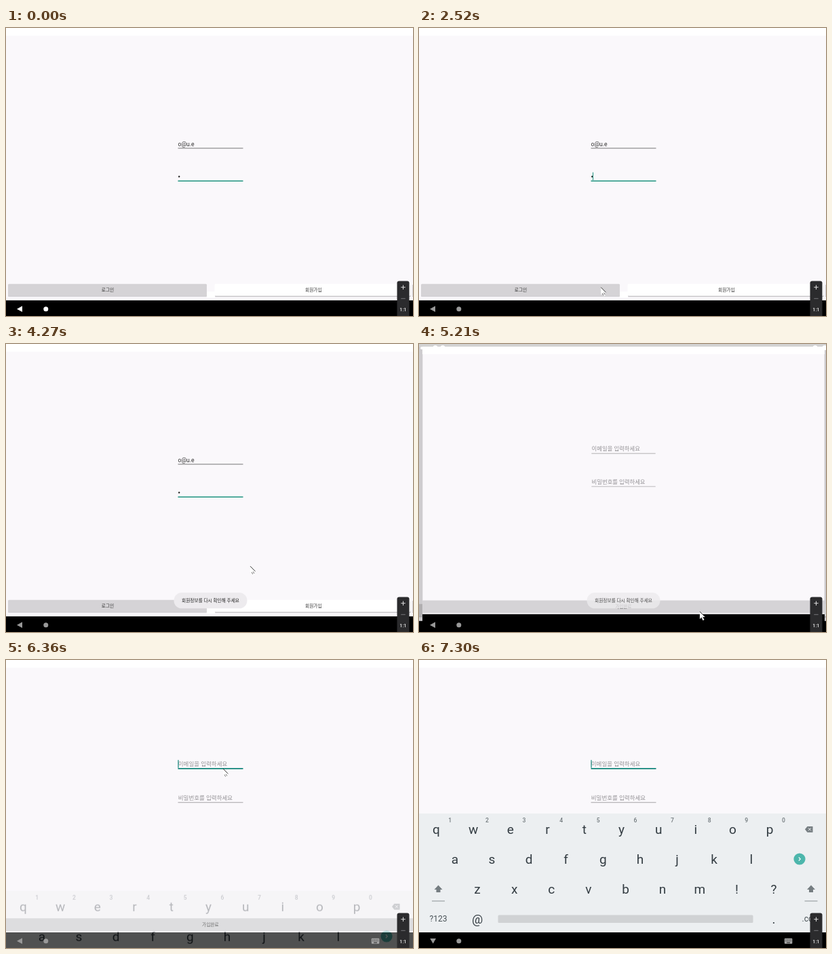
Write an HTML page with a canvas that moves like this. It is 600 by 424 pixels and loops after 7.73 s.

```html
<!DOCTYPE html>
<html lang="ko">
<head>
<meta charset="utf-8">
<style>
  html, body { margin: 0; width: 100%; height: 100%; overflow: hidden; background: #000; }
  canvas { display: block; }
</style>
</head>
<body>
<canvas id="stage" width="600" height="424"></canvas>
<script>
const LOOP = 7730, W = 600, H = 424;
// The device screen is a little wider than the stage
const DEVICE_W = 603, PIVOT_X = 301.5, PIVOT_Y = 214;
const FONT = 'Roboto, "Noto Sans CJK KR", "Noto Sans CJK", sans-serif';
const GREY = '#d5d3d6', TEAL = '#1f9480', DEEP_TEAL = '#12857a', PAPER = '#faf8fb';
const screen = document.getElementById('stage').getContext('2d');
let g = screen;

const clamp = v => Math.max(0, Math.min(1, v));
const ramp = (t, from, to) => clamp((t - from) / (to - from));
const easeOut = p => 1 - (1 - p) ** 3;

// Pointer waypoints: time, x, y
const path = [
  [240, 430, 94], [1000, 243, 379], [1180, 226, 386], [1390, 226, 386],
  [1520, 267, 381], [1730, 376, 384], [1970, 376, 384], [2240, 268, 382],
  [2520, 268, 382], [3180, 430, 239], [3300, 430, 239], [4270, 360, 327],
  [4610, 389, 384], [4880, 389, 384], [5210, 414, 394], [5520, 384, 361],
  [6060, 320, 160], [6700, 320, 160]
];

function rect(x, y, w, h, color, r = 0) {
  g.fillStyle = color;
  g.beginPath();
  g.roundRect(x, y, w, h, r);
  g.fill();
}

function disc(x, y, r, color) {
  g.fillStyle = color;
  g.beginPath();
  g.arc(x, y, r, 0, 7);
  g.fill();
}

function poly(color, ...pts) {
  g.fillStyle = color;
  g.beginPath();
  for (let i = 0; i < pts.length; i += 2) g.lineTo(pts[i], pts[i + 1]);
  g.fill();
}

function line(color, width, ...pts) {
  g.strokeStyle = color;
  g.lineWidth = width;
  g.beginPath();
  for (let i = 0; i < pts.length; i += 2) g.lineTo(pts[i], pts[i + 1]);
  g.stroke();
}

function text(s, x, y, size, color, align = 'center', weight = 400) {
  g.font = `${weight} ${size}px ${FONT}`;
  g.textAlign = align;
  g.fillStyle = color;
  g.fillText(s, x, y);
}

function blank() {
  rect(0, 0, DEVICE_W, H, '#000');
  rect(0, 0, DEVICE_W, 401, PAPER);
  rect(0, 0, DEVICE_W, 11.5, '#fff');
}

function loginPage(t) {
  blank();
  text('o@u.e', 253.5, 173.6, 8.6, '#333', 'left');
  rect(253.5, 176.6, 96, 0.9, '#777');
  disc(255.2, 218.7, 1.2, '#222');
  rect(253.5, 224.6, 96, 1.3, TEAL);
  if (t > 455 && Math.floor((t - 455) / 505) % 2 === 0) rect(256, 212.5, 1, 11.5, TEAL);
  rect(3, 394, 293, 1.6, '#c4c2c5', 1);
  rect(3, 376.8, 293, 18, GREY, 1.5);
  text('로그인', 150, 388, 6.7, '#333');
  rect(296, 388, 12, 9, '#fff');
  rect(308, 378, 289, 18, '#cfcdd0', 1.5);
  rect(307.5, 376.8, 289, 17.4, '#fff', 1.5);
  rect(599, 378, 1, 18, '#cfcdd0');
  text('회원가입', 453.3, 388, 6.7, '#333');
}

function signupPage(t) {
  blank();
  const focused = t >= 6210;
  text('이메일을 입력하세요', 253.8, 156.3, 8.5, '#949296', 'left');
  if (focused) rect(253.5, 159, 96, 1.8, DEEP_TEAL);
  else rect(253.5, 159.8, 96, 0.9, '#999');
  if (focused && !(t > 6740 && t < 7270)) rect(253.4, 147.3, 1.2, 11.4, DEEP_TEAL);
  text('비밀번호를 입력하세요', 253.8, 206.3, 8.5, '#949296', 'left');
  rect(253.5, 209.3, 96, 0.9, '#a5a3a6');
  rect(0, 380.3, DEVICE_W, 18.9, GREY);
  text('가입완료', 301.3, 391.6, 6.7, '#2e2e2e');
}

function shift(x) {
  poly('#757d81', x, 331.5, x + 6, 338, x + 3, 338, x + 3, 342, x - 3, 342, x - 3, 338, x - 6, 338);
  rect(x - 9.5, 354.4, 19, 1, '#8b9295');
}

function drawKeys() {
  const ink = '#333c42', step = 54.62;
  rect(0, 226, W, 175, '#eceff1');
  rect(0, 401, W, 23, '#000');
  const row = (keys, x, y) => [...keys].forEach((k, i) => text(k, x + i * step, y, 19, ink));
  row('qwertyuiop', 25.5, 256.3);
  row('asdfghjkl', 52.8, 300);
  row('zxcvbnm!?', 86, 344);
  [...'1234567890'].forEach((n, i) => text(n, 45.8 + i * step, 238.8, 8.6, '#70787c', 'center', 500));
  poly('#757d81', 569, 249.3, 572.5, 245, 580.5, 245, 580.5, 253.7, 572.5, 253.7);
  line('#eceff1', 1, 573.8, 247.2, 578, 251.4);
  line('#eceff1', 1, 578, 247.2, 573.8, 251.4);
  disc(561, 293, 8.6, '#4db6ac');
  line('#fff', 1.1, 559.8, 290.5, 562.3, 293, 559.8, 295.5);
  shift(28.5);
  shift(578);
  text('?123', 28.5, 385.3, 12, '#454e53');
  text('@', 86, 388, 18, ink);
  rect(116.5, 375.5, 376, 11.5, '#d0d2d4', 1.5);
  text('.', 523, 388, 19, ink);
  text('.com', 578, 385.3, 12, '#454e53');
}

function navIcons(t) {
  const v = 255 - 102 * ramp(t, 240, 500);
  const c = `rgb(${v},${v},${v})`;
  if (t < 6480) poly(c, 16, 413.7, 24, 409.3, 24, 418);
  else poly(c, 16.3, 410, 25, 410, 20.7, 417.5);
  disc(58.8, 413.8, 3.5, c);
  if (t < 6300) return;
  rect(538.8, 409.8, 11.5, 8, '#a5a5a5', 1);
  for (let i = 0; i < 4; i++) {
    rect(540.4 + i * 2.4, 411.3, 1, 1, '#222');
    rect(540.4 + i * 2.4, 413.3, 1, 1, '#222');
  }
  rect(542.2, 415.6, 4.8, 1, '#222');
}

function statusIcons() {
  for (const x of [4, 9, 14]) disc(x, 6, 2, '#fff');
  for (const x of [24, 35, 584, 598]) disc(x, 5.5, 3.6, '#fff');
}

function toast(t) {
  g.globalAlpha = ramp(t, 3090, 3270) * (1 - ramp(t, 5150, 5450));
  rect(247.5, 366, 108, 23.3, '#edebee', 11.6);
  text('회원정보를 다시 확인해 주세요', 301.5, 380.2, 6.7, '#222');
  g.globalAlpha = 1;
}

function pointer(t) {
  const i = path.findIndex(p => p[0] > t);
  if (i < 1) return;
  const a = path[i - 1], b = path[i], p = ramp(t, a[0], b[0]);
  g.save();
  g.translate(a[1] + (b[1] - a[1]) * p, a[2] + (b[2] - a[2]) * p);
  poly('#fff', 0, 0, 0, 11, 2.6, 8.6, 4.6, 13, 6.6, 12, 4.8, 8, 8, 8);
  line('#222', 0.9, 0, 0, 7.3, 7.5);
  line('#555', 0.8, 2, 8.6, 3.8, 11.8);
  line('#555', 0.8, 4.2, 7.8, 5.8, 10.8);
  g.restore();
}

function panel() {
  rect(576.5, 372.5, 18, 56, '#2b2b2d', 3);
  rect(582.3, 381.2, 6.4, 1, '#ddd');
  rect(585, 378.5, 1, 6.4, '#ddd');
  rect(582.3, 397.8, 6.4, 1, '#77777a');
  text('1:1', 585.4, 417, 7.2, '#eee', 'center', 500);
}

function scaled(s, draw) {
  g.save();
  g.translate(PIVOT_X, PIVOT_Y);
  g.scale(s, s);
  g.translate(-PIVOT_X, -PIVOT_Y);
  draw();
  g.restore();
}

// The keyboard is kept as one layer so that it can fade as a whole
const keys = document.createElement('canvas');
keys.width = W;
keys.height = H;
g = keys.getContext('2d');
drawKeys();
g = screen;

function draw(t) {
  const open = easeOut(ramp(t, 4952, 5452));
  if (open < 1) scaled(1 + 0.041 * open, () => loginPage(t));
  if (open > 0) {
    rect(0, 0, W, H, `rgba(0,0,0,${0.2 * open})`);
    g.globalAlpha = ramp(t, 4980, 5070);
    scaled(0.85 + 0.15 * open, () => signupPage(t));
    g.globalAlpha = 1;
  }
  statusIcons();
  if (t > 6300) {
    g.globalAlpha = ramp(t, 6300, 6480);
    g.drawImage(keys, 0, 198 * (1 - easeOut(ramp(t, 6302, 6652))));
    g.globalAlpha = 1;
  }
  navIcons(t);
  toast(t);
  pointer(t);
  panel();
}

const start = performance.now();
function tick() {
  draw((performance.now() - start) % LOOP);
  requestAnimationFrame(tick);
}
tick();
</script>
</body>
</html>
```
